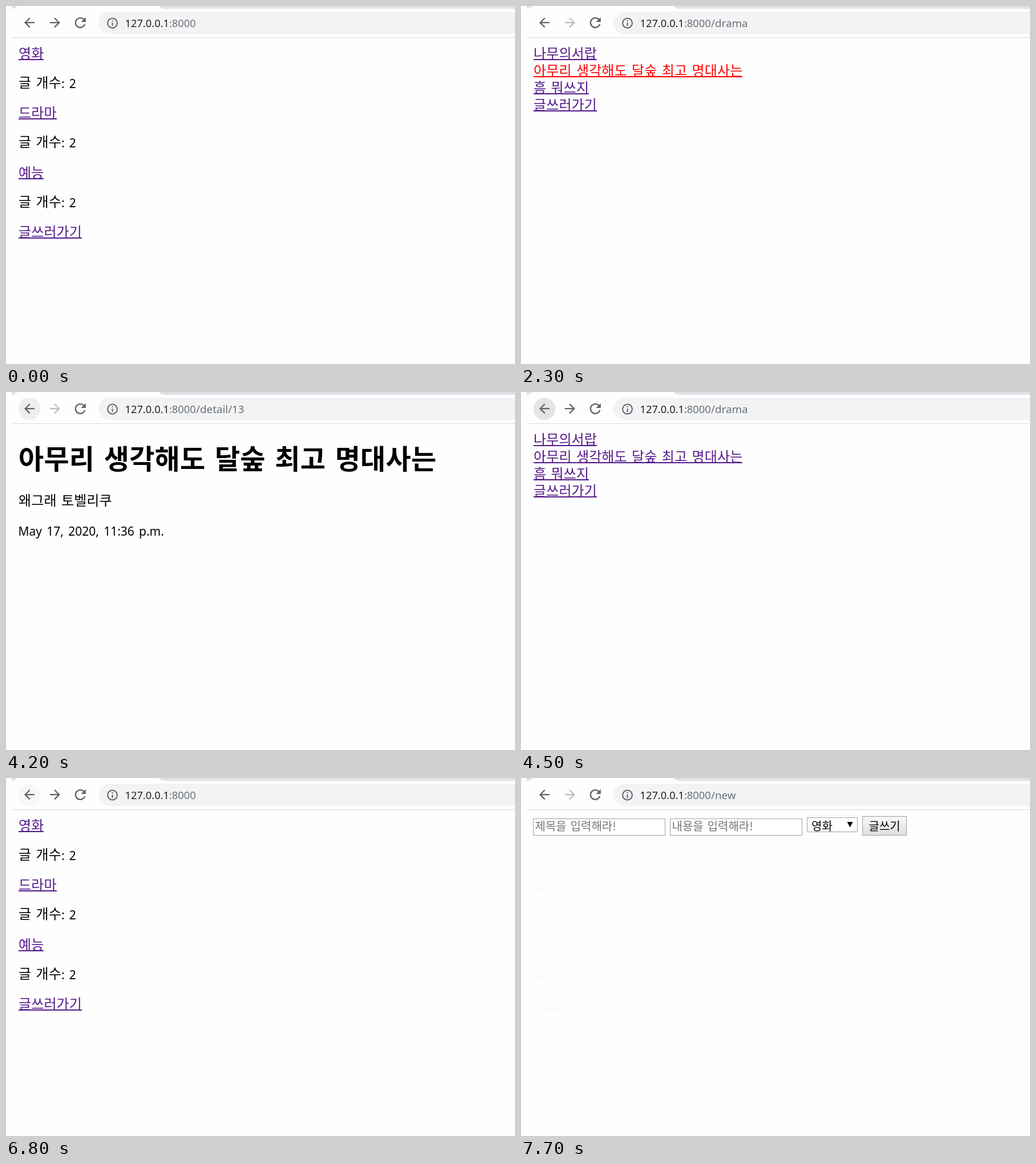
An HTML page that plays this animation: 892x628 px, repeating every 8000 ms.

```html
<!DOCTYPE html>
<html lang="ko">
<head>
<meta charset="utf-8">
<style>
html, body { margin: 0; width: 100%; height: 100%; overflow: hidden; background: #fefefe; }
svg { display: block; }
text { font: 24px "Noto Sans CJK KR", "Noto Sans CJK", sans-serif; letter-spacing: .12px; word-spacing: 1.5px; }
.latin { font: 21px "Noto Sans", "Open Sans", sans-serif; letter-spacing: 0; word-spacing: 2.8px; }
.url { font-size: 18.3px; }
#path { font-size: 18.8px; }
.title { font-size: 48px; font-weight: 700; letter-spacing: .24px; word-spacing: 2.9px; }
.small { font-size: 20px; letter-spacing: 0; word-spacing: 1.3px; }
.link { fill: #551a8b; }
.link.active { fill: #f00; }
.icon { fill: #5f6368; }
.field { fill: #fff; stroke: #a0a0a0; }
</style>
</head>
<body>
<svg width="892" height="628" viewBox="0 0 892 628">
  <defs>
    <path id="arrow" d="M20 11H7.83l5.59-5.59L12 4l-8 8 8 8 1.41-1.41L7.83 13H20z"/>
    <linearGradient id="face" x2="0" y2="1">
      <stop stop-color="#f8f8f8"/><stop offset="1" stop-color="#dfdfdf"/>
    </linearGradient>
  </defs>

  <!-- browser bar -->
  <path fill="#dee1e6" d="M10 0h10q-2 4-10 5zM268 0h624v5H278q-7 0-10-5z"/>
  <path fill="#dadce0" d="M10 55h882v1H10z"/>
  <rect x="162" y="10" width="780" height="39" rx="19.5" fill="#f1f3f4"/>
  <circle id="hover" cx="41" cy="29.7" r="19.3"/>
  <g class="icon">
    <use href="#arrow" transform="translate(27.5 15.7) scale(1.125)"/>
    <use id="forward" href="#arrow" transform="translate(99.3 15.7) scale(-1.125 1.125)"/>
    <path transform="translate(115.8 14.9) scale(1.2)" d="M17.65 6.35A7.96 7.96 0 0 0 12 4a8 8 0 1 0 7.73 10h-2.08A6 6 0 1 1 12 6c1.66 0 3.14.69 4.22 1.78L13 11h7V4z"/>
    <circle cx="186.5" cy="30" r="8.4" fill="none" stroke="#5f6368" stroke-width="2"/>
    <path d="M185.5 25h2v2h-2zM185.5 29h2v6h-2z"/>
  </g>
  <text class="latin url" x="208.5" y="37" fill="#202124">127.0.0.1<tspan fill="#6b6f74">:8000</tspan></text>
  <text class="latin" id="path" x="333" y="37" fill="#6b6f74"></text>

  <!-- pages -->
  <g id="home"></g>
  <g id="drama"></g>
  <g id="detail">
    <text class="title" x="22" y="135">아무리 생각해도 달숲 최고 명대사는</text>
    <text x="22" y="199">왜그래 토벨리쿠</text>
    <text class="latin" x="21.5" y="252">May 17, 2020, 11:36 p.m.</text>
  </g>
  <g id="new">
    <rect class="field" x="21.5" y="71.5" width="231" height="29"/>
    <rect class="field" x="261.5" y="71.5" width="231" height="29"/>
    <rect class="field" x="501.5" y="69.5" width="88" height="25"/>
    <rect class="field" x="598.5" y="67.5" width="77" height="33" style="fill:url(#face)"/>
    <g fill="#757575">
      <text class="small" x="24.5" y="92">제목을 입력해라!</text>
      <text class="small" x="264.5" y="92">내용을 입력해라!</text>
    </g>
    <text class="small" x="509" y="91.5">영화</text>
    <text class="small" x="609.5" y="91.5">글쓰기</text>
    <path d="M571.5 77h10l-5 9.5z"/>
  </g>
</svg>
<script>
const $ = id => document.getElementById(id);

// Adds a link whose underline ends at the given bottom edge.
function addLink(page, label, bottom) {
  $(page).insertAdjacentHTML('beforeend',
    `<g class="link"><text x="22" y="${bottom - 3.5}">${label}</text><rect x="22" y="${bottom - 2}" height="2"/></g>`);
  const link = $(page).lastElementChild;
  link.lastChild.setAttribute('width', Math.round(link.firstChild.getComputedTextLength()));
  return link;
}

const homeLinks = ['영화', '드라마', '예능', '글쓰러가기'].map((label, i) => {
  const bottom = Math.round(95 + i * 104.3);
  if (i < 3) $('home').insertAdjacentHTML('beforeend',
    `<text x="22" y="${bottom + 48}">글 개수<tspan class="latin" dy="1">: 2</tspan></text>`);
  return addLink('home', label, bottom);
});
const dramaLinks = ['나무의서랍', '아무리 생각해도 달숲 최고 명대사는', '흠 뭐쓰지', '글쓰러가기']
  .map((label, i) => addLink('drama', label, 95 + i * 30));

const paths = { home: '', drama: '/drama', detail: '/detail/13', new: '/new' };

// start, page, fading page, its opacity
const visits = [
  [0, 'home'],
  [700, 'drama', 'home', .15], [800, 'drama'],
  [2500, 'detail', 'drama', .15], [2600, 'detail'],
  [4500, 'drama'],
  [6300, 'home', 'drama', .15], [6400, 'home'],
  [7600, 'new', 'home', .15], [7700, 'new', 'home', .015]
];
const hovers = [[0, 'none'], [3900, '#f7f7f7'], [4200, '#eeeeee'], [4500, '#e4e4e4'], [6800, '#f7f7f7'], [7000, 'none']];
const presses = [[homeLinks[1], 500, 700], [dramaLinks[1], 2300, 2500], [homeLinks[3], 7300, 7600]];

const at = (steps, t) => steps.findLast(step => step[0] <= t);

function draw(now) {
  const t = now % 8000;
  const [, page, old, opacity] = at(visits, t);
  for (const id in paths)
    $(id).setAttribute('opacity', id === page ? 1 : id === old ? opacity : 0);
  $('path').textContent = paths[page];
  $('hover').setAttribute('fill', at(hovers, t)[1]);
  const canForward = page === 'home' || (page === 'drama' && t >= 4500);
  $('forward').setAttribute('fill', canForward ? '#5f6368' : '#babcbe');
  for (const [link, from, to] of presses)
    link.classList.toggle('active', t >= from && t < to);
}

const start = performance.now();
function tick() {
  draw(performance.now() - start);
  requestAnimationFrame(tick);
}
tick();
</script>
</body>
</html>
```
